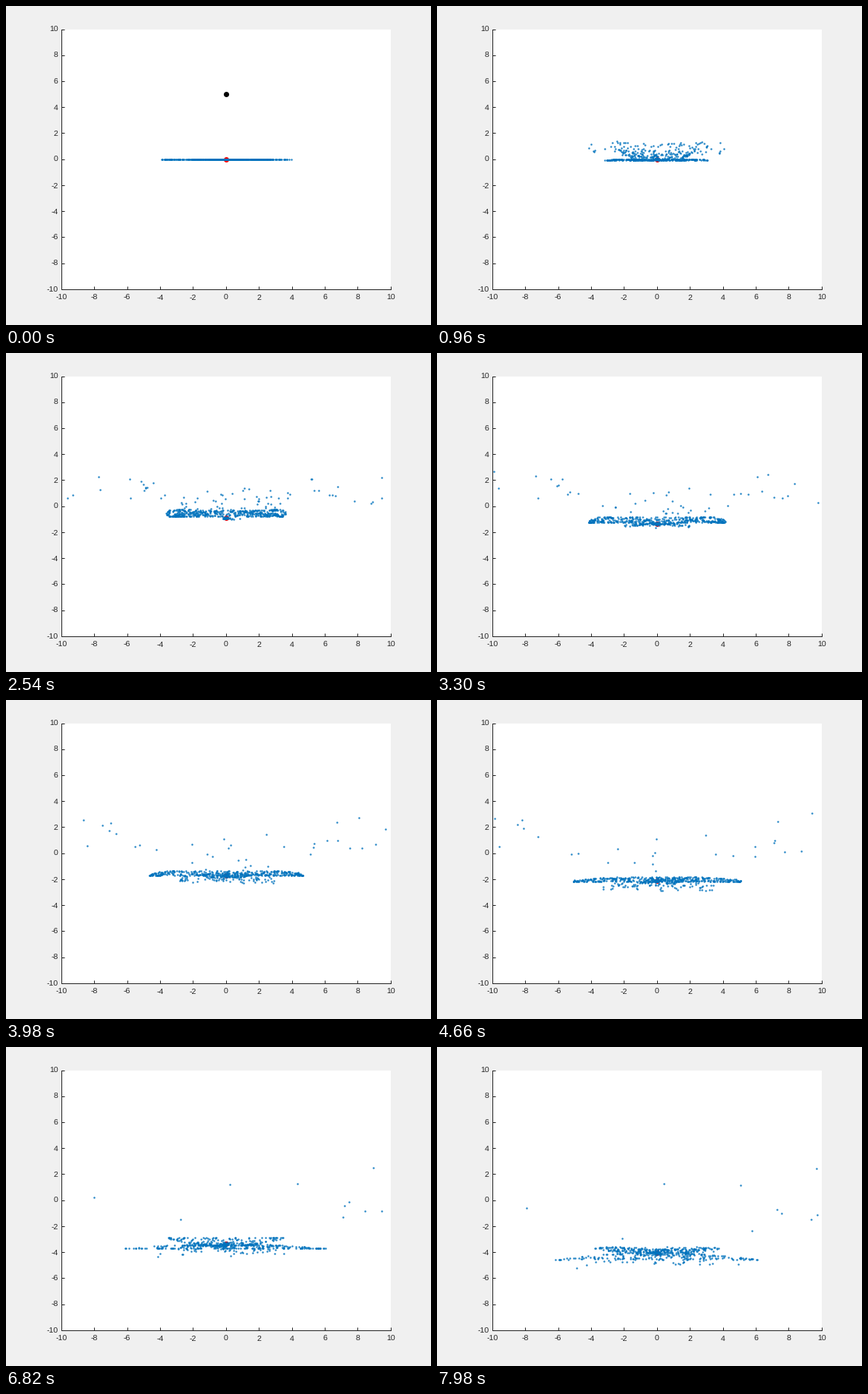
A matplotlib script for the animation above (8000 ms loop, 560 px wide and 420 px high).

```python
import numpy as np
import matplotlib.pyplot as plt
from matplotlib.animation import FuncAnimation

# A heavy body falls through an edge-on disc of stars; rings spread outwards.
W, H, DPI = 560, 420, 80
PX = 72 / DPI                      # points per pixel
FRAMES, STEP = 400, 0.02           # seconds per frame
SUB = 40                           # integration steps per frame
STARS, RADIUS, GM = 600, 4.0, 27.5
HIT = 0.28                         # moment the intruder crosses the disc
DRIFT, ZERO = 0.575, 0.96          # core speed after the hit, time it is back at 0
INK = (0.15, 0.15, 0.15)

rng = np.random.default_rng(11)
r0 = 0.06 + (RADIUS - 0.06) * rng.uniform(0, 1, STARS) ** 1.15
phase = rng.uniform(0, 2 * np.pi, STARS)
spin = np.sqrt(GM / r0 ** 3)
ang_mom = np.sqrt(GM * r0)
eccentricity = 0.65 * r0 ** -0.42 / (1 + (0.19 / r0) ** 8)
kick = eccentricity * np.sqrt(GM / r0)


def bump(centre, width):
    return np.exp(-(np.log(r0 / centre) / width) ** 2)


# Tilt of each orbit: outer warp, raised middle layer, plunging inner orbits.
warp = 0.12 * (r0 / RADIUS) ** 2
layer = 0.17 * bump(1.5, 0.5)
plunge = 0.38 * bump(0.5, 0.7) * rng.uniform(0.6, 1.3, STARS)
blob = 0.8 * np.exp(-(r0 / 0.14) ** 2)


def core_y(t):
    if t < HIT:
        return DRIFT * (ZERO - HIT) * (t / HIT) ** 4
    return -DRIFT * (t - ZERO)


def intruder_y(t):
    return 5 - 18.3 * t


def height(nu):
    return (warp * np.sin(0.75 * np.pi - nu) - layer * np.cos(nu)
            + plunge * np.cos((nu - np.pi) / 3) + blob * np.sin(nu / 2))


def trace_stars():
    xs, ys = np.empty((2, FRAMES, STARS))
    r, u = r0.copy(), -kick
    nu = np.full(STARS, -np.pi / 2)
    dt = STEP / SUB
    for i in range(FRAMES):
        t = i * STEP
        early = min(t - HIT, 0)
        lift = min(t / HIT, 1) ** 4
        xs[i] = r * np.cos(phase + nu + spin * early)
        ys[i] = core_y(t) + lift * r * height(nu)
        if t > HIT - STEP / 2:
            for _ in range(SUB):
                u = u + dt * (ang_mom ** 2 / r - GM) / r ** 2
                r = r + dt * u
                nu = nu + dt * ang_mom / r ** 2
    hidden = (np.abs(xs) > 10) | (np.abs(ys) > 10)
    xs[hidden] = np.nan
    return xs, ys


star_x, star_y = trace_stars()

plt.rcParams.update({"font.family": "Liberation Sans", "text.hinting": "none"})
fig = plt.figure(figsize=(W / DPI, H / DPI), dpi=DPI, facecolor="#f0f0f0")
ax = fig.add_axes([0.13, 0.11 + 1 / H, 0.775, 0.815], facecolor="white")
ax.set(xlim=(-10, 10), ylim=(-10, 10))
ticks = range(-10, 11, 2)
labels = [str(v) for v in ticks]
ax.set_xticks(ticks, labels)
ax.set_yticks(ticks, labels)
ax.tick_params(direction="in", length=4.3 * PX, width=PX, color=INK,
               labelcolor=INK, labelsize=10.5 * PX)
ax.tick_params(axis="x", pad=7 * PX)
ax.tick_params(axis="y", pad=4 * PX)
for side in ("top", "right"):
    ax.spines[side].set_visible(False)
for side in ("left", "bottom"):
    ax.spines[side].set(color=INK, linewidth=PX)


def dots(color, size, z, alpha=1):
    return ax.plot([], [], "o", color=color, ms=size * PX, mew=0,
                   alpha=alpha, zorder=z, clip_on=False)[0]


core = dots("red", 7, 3)
intruder = dots("black", 7, 4)
stars = dots("#0072bd", 2.5, 5, 0.85)


def draw(i):
    t = i * STEP
    core.set_data([0], [core_y(t)])
    y = intruder_y(t)
    intruder.set_data([0], [y])
    intruder.set_visible(y > -10)
    stars.set_data(star_x[i], star_y[i])
    return core, intruder, stars


anim = FuncAnimation(fig, draw, frames=FRAMES, interval=20,
                     repeat=True, repeat_delay=0)
plt.show()
```
